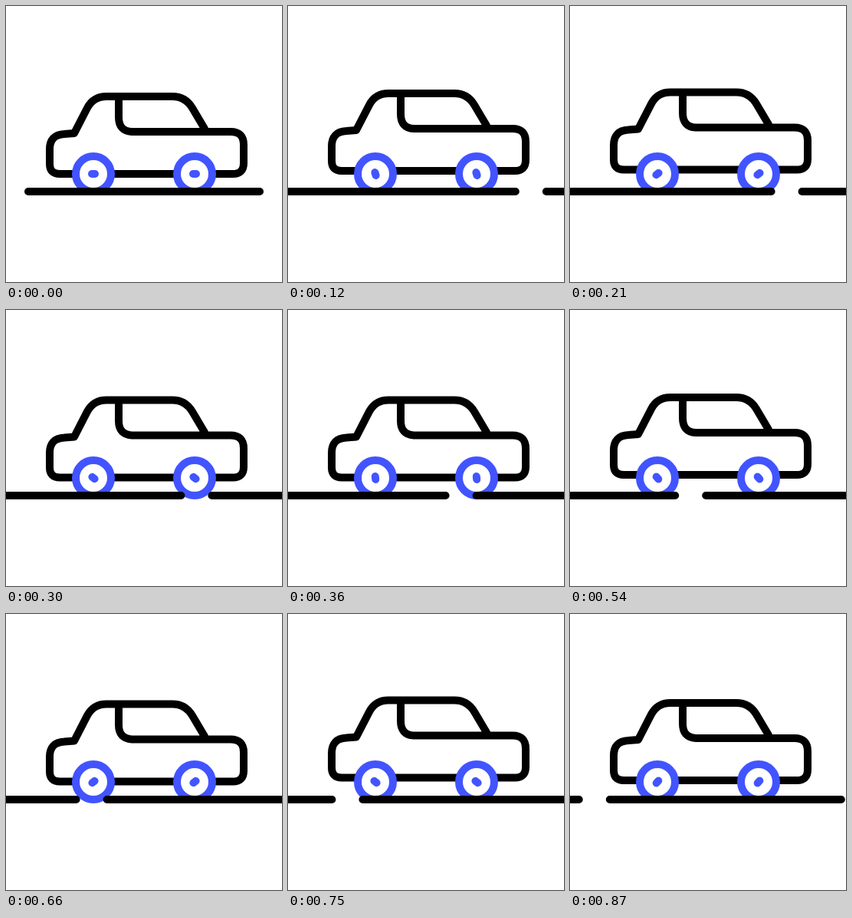
Recreate the animation shown at these times as an HTML page. Size 360 px wide and 360 px high, loop 900 ms.

```html
<!DOCTYPE html>
<html lang="en">
<head>
<meta charset="utf-8">
<title>Driving car</title>
<style>
  html, body { margin: 0; width: 100%; height: 100%; overflow: hidden; background: #fff; }
  svg { display: block; width: 100vw; height: 100vh; }
  path, circle { stroke-width: 10; stroke-linecap: round; stroke-linejoin: round; }
</style>
</head>
<body>
<svg viewBox="0 0 360 360" fill="none" stroke="#000">
  <g id="car">
    <path d="M259 160L243 133Q234 118 217 118H131Q114 118 106 133L89 166L76 167Q57 168 57 187V206Q57 219 70 219H296Q310 219 310 205V181Q310 164 293 164H164Q147 163 147 145V118"/>
  </g>
  <g stroke="#4254ff">
    <g transform="translate(114 219)">
      <circle r="23" fill="#fff"/>
      <path class="hub" d="M-2 0H2"/>
    </g>
    <g transform="translate(246 219)">
      <circle r="23" fill="#fff"/>
      <path class="hub" d="M-2 0H2"/>
    </g>
  </g>
  <path id="road" d="M29 242H331M371 242H673"/>
</svg>
<script>
  const LOOP = 900, STEP = 30, STEPS = 30;
  const ROAD_PERIOD = 342, BOUNCE = 6, BOUNCES = 3, TURNS = 2;
  const car = document.getElementById('car');
  const road = document.getElementById('road');
  const hubs = document.querySelectorAll('.hub');
  const start = performance.now();

  function draw() {
    const time = (performance.now() - start) % LOOP;
    // The rest pose is held for two steps.
    const p = Math.max(0, Math.floor(time / STEP) - 1) / STEPS;
    const lift = BOUNCE * (1 - Math.cos(2 * Math.PI * BOUNCES * p)) / 2;
    car.setAttribute('transform', `translate(0 ${-lift})`);
    road.setAttribute('transform', `translate(${-ROAD_PERIOD * p} 0)`);
    for (const hub of hubs) hub.setAttribute('transform', `rotate(${360 * TURNS * p})`);
    requestAnimationFrame(draw);
  }
  draw();
</script>
</body>
</html>
```
